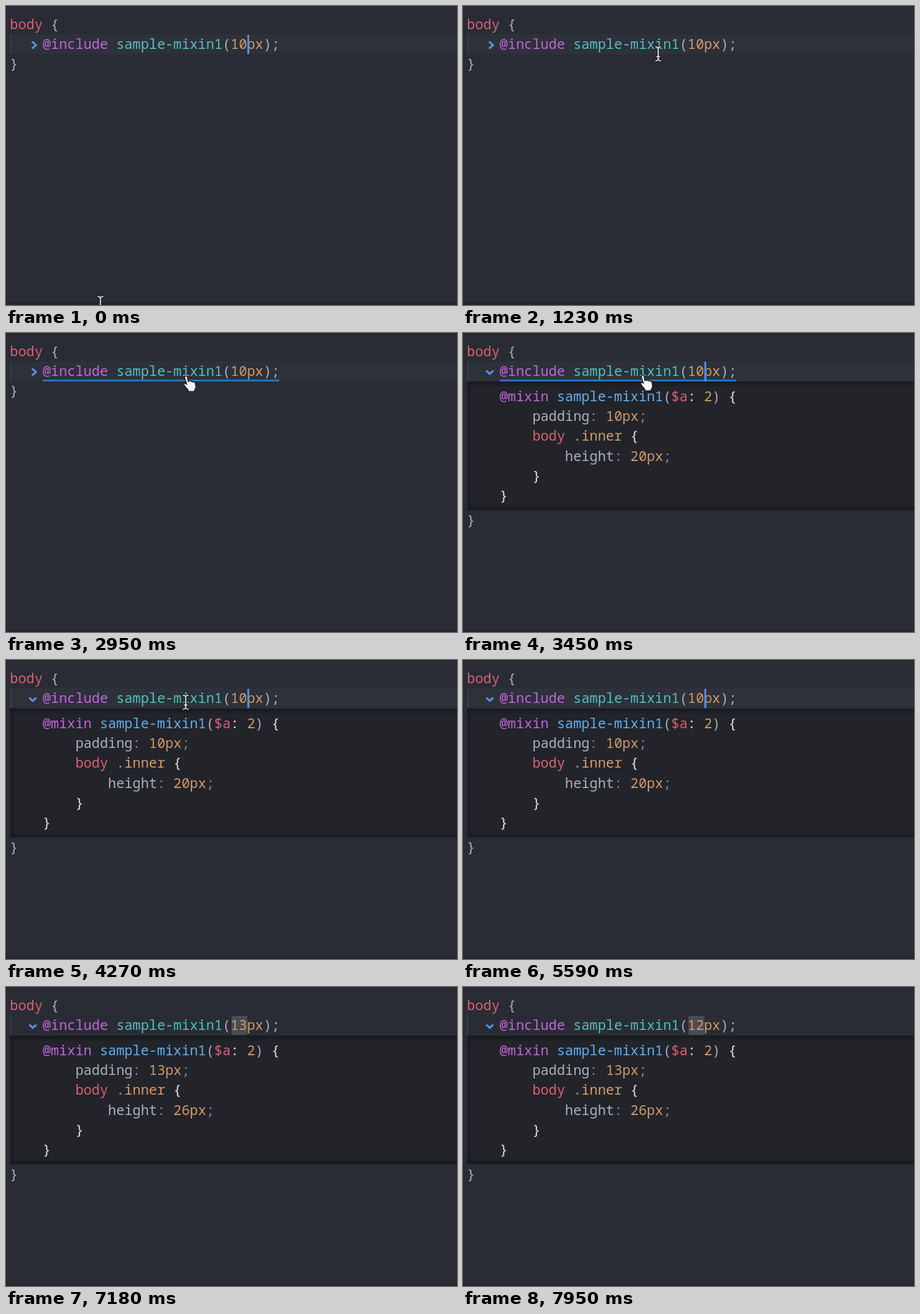
Recreate the animation shown at these times as an HTML page. Size 640 px wide and 425 px high, loop 8000 ms.

```html
<!DOCTYPE html>
<html lang="en">
<head>
<meta charset="utf-8">
<title>Inline mixin preview</title>
<style>
  html, body { margin: 0; width: 100%; height: 100%; overflow: hidden; background: #292c34; }
  svg { display: block; width: 100vw; height: 100vh; }
  text { font: 500 19.33px "Noto Sans Mono", "DejaVu Sans Mono", monospace; white-space: pre; }
</style>
</head>
<body>
<svg id="stage" viewBox="0 0 640 425">
  <defs>
    <linearGradient id="down" x2="0" y2="1">
      <stop stop-color="#15171b" stop-opacity=".8"/>
      <stop offset="1" stop-color="#15171b" stop-opacity="0"/>
    </linearGradient>
    <linearGradient id="up" y1="1" x2="0" y2="0">
      <stop stop-color="#15171b" stop-opacity=".8"/>
      <stop offset="1" stop-color="#15171b" stop-opacity="0"/>
    </linearGradient>
    <linearGradient id="side">
      <stop stop-color="#15171b" stop-opacity=".6"/>
      <stop offset="1" stop-color="#15171b" stop-opacity="0"/>
    </linearGradient>
  </defs>
  <rect width="640" height="425" fill="#292c34"/>
  <rect y="421.5" width="640" height="3.5" fill="#25262d"/>
  <rect id="row" x="6" y="40" width="634" height="28.5" fill="#2d313a"/>
  <rect x="6" y="40" width="1" height="28.5" fill="#424650"/>
  <rect id="selection" x="320" y="41" width="22.5" height="27" fill="#484c55"/>
  <g id="panel">
    <rect x="6" y="69" width="634" height="183" fill="#22242a"/>
    <rect x="6" y="69" width="634" height="9" fill="url(#down)"/>
    <rect x="6" y="243" width="634" height="9" fill="url(#up)"/>
    <rect x="6" y="69" width="8" height="183" fill="url(#side)"/>
  </g>
  <g id="code"></g>
  <path id="chevron" fill="none" stroke="#5a8fe3" stroke-width="3"/>
  <rect id="underline" x="52" y="66.5" width="336" height="2" fill="#2c86dc"/>
  <rect id="caret" x="342.5" y="41" width="2.6" height="27.5" fill="#5a8ff0"/>
  <g id="beam" fill="none" stroke-linecap="round">
    <path id="beamEdge" stroke="#181a1f" stroke-width="3.4"/>
    <path id="beamCore" stroke="#e9eaec" stroke-width="1.6"/>
  </g>
  <path id="hand" fill="#f5f5f5" stroke="#15171b" stroke-width="1.2" stroke-linejoin="round"
    d="M-2 1Q-2-1 0-1Q2-1 2 1L3 7Q4 5 6 6.5Q8 5.500 9 7.500Q12 6.500 13 9L14 14Q14 17 12 19V21H3V19L-2 13Q-4 10-2 9.500Q0 9 1 11Z"/>
</svg>
<script>
const LOOP = 8000, COL = 11.6, LEFT = 5.6;
const C = { red: '#dc5f74', purple: '#c366dc', teal: '#52c2bd', orange: '#d39b68',
  blue: '#62b0ee', grey: '#acb0b9', dim: '#858992', white: '#e4e5e8' };
const $ = id => document.getElementById(id);
const show = (id, on) => $(id).setAttribute('visibility', on ? 'visible' : 'hidden');

function write(parent, y, ...runs) {
  return runs.map(([col, str, color]) => {
    const el = document.createElementNS('http://www.w3.org/2000/svg', 'text');
    el.setAttribute('x', LEFT + col * COL);
    el.setAttribute('y', y);
    el.setAttribute('fill', C[color]);
    el.textContent = str;
    parent.append(el);
    return el;
  });
}

const code = $('code'), panel = $('panel');
write(code, 33, [0, 'body', 'red'], [5, '{', 'grey']);
const arg = write(code, 61, [4, '@include', 'purple'], [13, 'sample-mixin1', 'teal'],
  [26, '(', 'grey'], [27, '10px', 'orange'], [31, ');', 'grey'])[3];
const close = write(code, 89, [0, '}', 'grey'])[0];

write(panel, 97, [4, '@mixin', 'purple'], [11, 'sample-mixin1', 'blue'], [24, '(', 'grey'],
  [25, '$a', 'red'], [27, ':', 'white'], [29, '2', 'orange'], [30, ')', 'grey'], [32, '{', 'white']);
const padding = write(panel, 125, [8, 'padding', 'grey'], [15, ':', 'dim'],
  [17, '10px', 'orange'], [21, ';', 'dim'])[2];
write(panel, 153, [8, 'body', 'red'], [13, '.inner', 'orange'], [20, '{', 'white']);
const height = write(panel, 181.500, [12, 'height', 'grey'], [18, ':', 'dim'],
  [20, '20px', 'orange'], [24, ';', 'dim'])[2];
write(panel, 209.500, [8, '}', 'white']);
write(panel, 237.500, [4, '}', 'white']);

const beam = 'M-3.500-10Q-1-10 0-8Q1-10 3.500-10M0-8V8M-3.500 10Q-1 10 0 8Q1 10 3.500 10M-2 4H2';
$('beamEdge').setAttribute('d', beam);
$('beamCore').setAttribute('d', beam);

// Mouse stops: time, x, y
const path = [[0, 134, 423], [100, 134, 421], [450, 142, 270], [840, 172, 124], [1180, 277, 68],
  [1500, 277, 67], [1950, 258, 63], [3300, 255, 62], [3600, 255, 60], [4400, 255, 60],
  [4880, 520, -14]];
// Argument steps: time, value
const steps = [[0, 10], [6400, 11], [6680, 12], [6950, 13], [7220, 14], [7550, 13], [7880, 12]];
const LAG = 150, HOVER = 2000, OPEN = 3100, LEAVE = 3500, SELECT = 5950;

const valueAt = t => steps.filter(s => s[0] <= t).pop()[1];

function mouseAt(t) {
  const i = path.findIndex(p => p[0] > t);
  if (i < 0) return [520, -40];
  const [t0, x0, y0] = path[i - 1], [t1, x1, y1] = path[i];
  const u = (t - t0) / (t1 - t0);
  const k = t < 840 ? u : u * u * (3 - 2 * u);
  return [x0 + (x1 - x0) * k, y0 + (y1 - y0) * k];
}

function draw(t) {
  const open = t >= OPEN, hover = t >= HOVER && t < LEAVE, selected = t >= SELECT;
  const result = valueAt(Math.max(0, t - LAG));
  const [x, y] = mouseAt(t);

  arg.textContent = valueAt(t) + 'px';
  padding.textContent = result + 'px';
  height.textContent = result * 2 + 'px';
  close.setAttribute('y', open ? 273 : 89);
  $('chevron').setAttribute('d', open ? 'M33 53.500L38 58L43 53.500' : 'M37 50.500L42.500 55.500L37 60.500');

  show('panel', open);
  show('row', !selected);
  show('selection', selected);
  show('underline', hover);
  show('caret', !selected && (t + 50) % 800 < 400);
  show('beam', !hover);
  show('hand', hover);
  $('beam').setAttribute('transform', `translate(${x} ${y})`);
  $('hand').setAttribute('transform', `translate(${x} ${y})`);
}

const start = performance.now();
function tick() {
  draw((performance.now() - start) % LOOP);
  requestAnimationFrame(tick);
}
tick();
</script>
</body>
</html>
```
